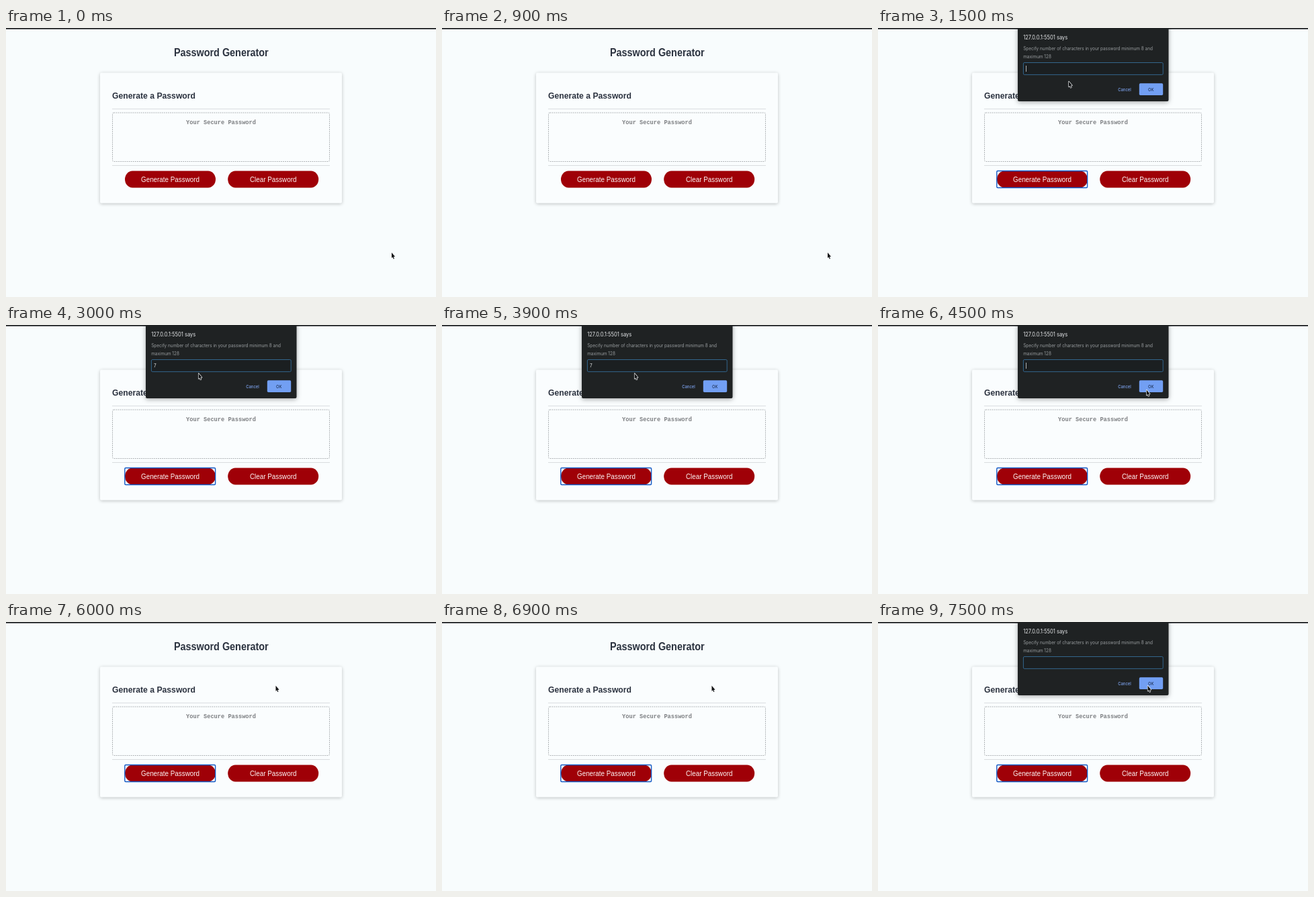
These frames come from a looping animation (640x400 px, 8 s). An HTML page with a canvas:

```html
<!DOCTYPE html>
<html lang="en">
<head>
<meta charset="utf-8">
<title>Password Generator</title>
<style>
  html, body { margin: 0; width: 100%; height: 100%; overflow: hidden; background: #f8fcfd; }
  canvas { display: block; width: 640px; height: 400px; }
</style>
</head>
<body>
<canvas id="stage"></canvas>
<script>
const canvas = document.getElementById('stage');
const ctx = canvas.getContext('2d');
const dpr = window.devicePixelRatio || 1;
canvas.width = 640 * dpr;
canvas.height = 400 * dpr;

const LOOP = 8000;
const SQUEEZE = 0.9;
const SANS = '"Liberation Sans", Arial, sans-serif';
const MONO = '"Liberation Mono", "Courier New", monospace';
const UI = 'Inter, Roboto, sans-serif';

// Each step holds until the next one begins.
const steps = [
  { at: 0, cursor: [574, 334] },
  { at: 1500, cursor: [284, 79.5], focus: true, dialog: true, caret: true },
  { at: 3000, cursor: [286.6, 72], focus: true, dialog: true, value: '7' },
  { at: 4500, cursor: [399.7, 96.5], focus: true, dialog: true, caret: true },
  { at: 6000, cursor: [401.5, 94.7], focus: true },
  { at: 7500, cursor: [401.5, 94.7], focus: true, dialog: true }
];

function text(str, x, y, font, color, align = 'left') {
  ctx.save();
  ctx.translate(x, y);
  ctx.scale(SQUEEZE, 1);
  ctx.font = font;
  ctx.fillStyle = color;
  ctx.textAlign = align;
  ctx.fillText(str, 0, 0);
  ctx.restore();
}

function box(x, y, w, h, r, fill) {
  ctx.beginPath();
  ctx.roundRect(x, y, w, h, r);
  ctx.fillStyle = fill;
  ctx.fill();
}

function outline(x, y, w, h, r, color, width) {
  ctx.beginPath();
  ctx.roundRect(x, y, w, h, r);
  ctx.strokeStyle = color;
  ctx.lineWidth = width;
  ctx.stroke();
}

function shadowBox(x, y, w, h, r, fill, shadow, blur, dy) {
  ctx.save();
  ctx.shadowColor = shadow;
  ctx.shadowBlur = blur * dpr;
  ctx.shadowOffsetY = dy * dpr;
  box(x, y, w, h, r, fill);
  ctx.restore();
}

function pill(x, label) {
  box(x, 212.5, 135, 25, { x: 11.25, y: 12.5 }, '#9f0007');
  text(label, x + 67.5, 229, `10.95px ${SANS}`, '#fdf6f6', 'center');
}

function drawPage(focus) {
  ctx.fillStyle = '#f8fcfd';
  ctx.fillRect(0, 0, 640, 400);
  ctx.fillStyle = '#242628';
  ctx.fillRect(0, 0, 640, 1.8);
  text('Password Generator', 320.3, 41.8, `bold 16px ${SANS}`, '#2c3340', 'center');

  shadowBox(140, 66.5, 360, 194, 2, '#fafdfe', 'rgba(0,0,0,0.24)', 5, 1);
  text('Generate a Password', 158, 105.2, `bold 13.55px ${SANS}`, '#2c3340');
  ctx.fillStyle = '#d9dddf';
  ctx.fillRect(158, 119.8, 324, 1);
  ctx.fillRect(158, 204, 324, 1);

  ctx.setLineDash([1.8, 1.3]);
  outline(158.5, 126, 323, 72.5, 2, '#a9adb0', 1);
  ctx.setLineDash([]);
  text('Your Secure Password', 320, 143, `bold 9.62px ${MONO}`, '#7d7f82', 'center');

  pill(177, 'Generate Password');
  pill(330.2, 'Clear Password');
  if (focus) outline(176.8, 212.5, 134.8, 25, 1.5, '#1259c4', 1.4);
}

function drawDialog({ value, caret }) {
  shadowBox(208, -4, 224.5, 113, 2, '#1f2223', 'rgba(0,0,0,0.35)', 7, 1.5);
  text('127.0.0.1:5501 says', 216.2, 17.4, `8.4px ${UI}`, '#e4e6e8');
  const small = `7.15px ${UI}`;
  text('Specify number of characters in your password minimum 8 and', 216.2, 33.4, small, '#979b9e');
  text('maximum 128', 216.2, 44.5, small, '#979b9e');

  box(216, 51, 208.5, 18.8, 1.5, '#1b1f21');
  outline(216.4, 51.5, 207.8, 17.9, 1.5, '#33658c', 1);
  if (value) text(value, 220, 62.8, small, '#e4e6e8');
  if (caret) {
    ctx.fillStyle = '#d5dadd';
    ctx.fillRect(220.2, 56, 0.8, 9);
  }

  text('Cancel', 367, 93.5, `500 6.6px ${UI}`, '#7ba0ea', 'center');
  box(388.8, 82.3, 35.4, 17.8, 1.8, '#729ff3');
  text('OK', 406.2, 93.5, `500 6.6px ${UI}`, '#253a60', 'center');
}

function drawCursor([x, y]) {
  const shape = [[0, 0], [0, 8], [1.6, 6.6], [2.7, 9.4], [3.9, 8.9], [2.8, 6.2], [5, 6]];
  ctx.beginPath();
  shape.forEach(([dx, dy]) => ctx.lineTo(x + dx, y + dy));
  ctx.closePath();
  ctx.lineJoin = 'round';
  ctx.strokeStyle = '#f4f6f7';
  ctx.lineWidth = 1.3;
  ctx.stroke();
  ctx.fillStyle = '#101214';
  ctx.fill();
}

const start = performance.now();

function render() {
  const time = (performance.now() - start) % LOOP;
  const step = steps.findLast(s => s.at <= time);
  ctx.setTransform(dpr, 0, 0, dpr, 0, 0);
  drawPage(step.focus);
  if (step.dialog) drawDialog(step);
  drawCursor(step.cursor);
  requestAnimationFrame(render);
}
render();
</script>
</body>
</html>
```
